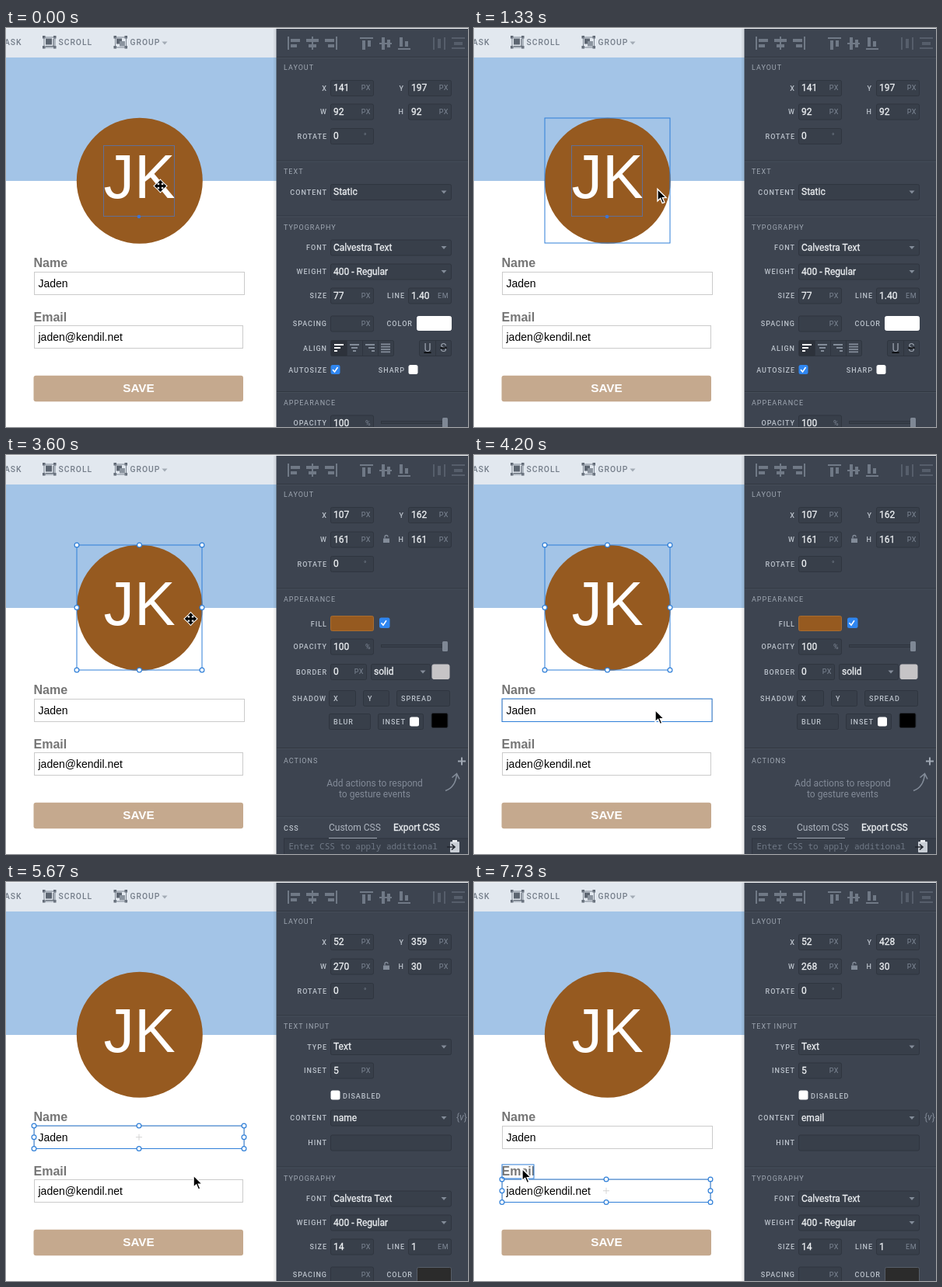
These frames come from a looping animation (594 by 514 pixels, 8000 ms). An HTML page:

```html
<!DOCTYPE html>
<html lang="en">
<head>
<meta charset="utf-8">
<title>Design editor</title>
<style>
html, body { margin: 0; width: 100%; height: 100%; overflow: hidden; background: #fff; }
svg { display: block; }
text { font-family: Roboto, sans-serif; white-space: pre; }
.bar { font-size: 10.3px; font-weight: 500; letter-spacing: 1px; fill: #747d89; }
.title { font-size: 9px; letter-spacing: 1px; fill: #a0a8b3; }
.label { font-size: 9px; font-weight: 500; letter-spacing: 1px; fill: #bcc3cc; }
.value { font-size: 12px; fill: #eceff2; stroke: #eceff2; stroke-width: .3px; }
.unit { font-size: 9px; letter-spacing: .5px; fill: #7f8896; }
.hint { font-size: 12px; fill: #828a97; }
.tab { font-size: 12px; fill: #aeb5bf; }
.mark { font-size: 14px; fill: #9aa2ae; }
.code { font: 11px "Noto Sans Mono", monospace; fill: #6f7885; }
.form { font: 14px "Liberation Sans", Arial, sans-serif; fill: #000; }
.head { font: bold 16px "Liberation Sans", Arial, sans-serif; fill: #757575; }
.save { font: bold 15.3px "Liberation Sans", Arial, sans-serif; fill: #fff; }
.logo { font: 79px "Liberation Sans", Arial, sans-serif; fill: #fff; }
</style>
</head>
<body>
<svg id="stage" width="594" height="514" viewBox="0 0 594 514"></svg>
<script>
const stage = document.getElementById('stage');
const BLUE = '#2f7fd8', BROWN = '#965a20', GREY = '#838c99';

// Markup helpers
const rect = (x, y, w, h, fill, more = '') =>
  `<rect x="${x}" y="${y}" width="${w}" height="${h}" fill="${fill}" ${more}/>`;
const path = (d, stroke, width = 1, fill = 'none') =>
  `<path d="${d}" stroke="${stroke}" stroke-width="${width}" fill="${fill}"/>`;
const text = (x, y, s, cls, anchor = 'start') =>
  `<text x="${x}" y="${y}" class="${cls}" text-anchor="${anchor}">${s}</text>`;
const frame = (x, y, w, h, color) => rect(x, y, w, h, 'none', `stroke="${color}"`);
const add = html => {
  const g = document.createElementNS('http://www.w3.org/2000/svg', 'g');
  g.innerHTML = html;
  return stage.appendChild(g);
};

// Property panel helpers; cy is the middle of a row
const title = (cy, s) => text(357, cy + 3.2, s, 'title');
const label = (cy, s, right = 412) => text(right + 1, cy + 3.5, s, 'label', 'end');
const box = (x, cy, w) => rect(x + .5, cy - 9.5, w - 1, 20, '#383f4a', 'rx="2" stroke="#2f353f"');
const field = (x, cy, value = '', unit = '', w = 56) =>
  box(x, cy, w) + text(x + 4, cy + 4, value, 'value') +
  text(x + w - 4, cy + 3, unit, 'unit', 'end');
const drop = (x, cy, value, w = 156) =>
  field(x, cy, value, '', w) +
  path(`M${x + w - 13.5} ${cy - 1.5}h7l-3.5 4z`, 'none', 0, GREY);
const rule = y => rect(348, y, 246, 1, '#313740') + rect(348, y + 1, 246, 1, '#464e5a');
const check = (x, y, size, on) =>
  rect(x, y, size, size, on ? '#2f86f0' : '#fff', 'rx="2.5"') +
  (on ? path(`M${x + 2.5} ${y + size / 2}l2.5 3l4-6`, '#fff', 1.6) : '');
const slider = cy => rect(482.5, cy - 2, 84, 3, '#383f4a', 'stroke="#2f353f"') +
  rect(561, cy - 6.5, 7, 13, '#7f8895', 'rx="1.5"');
const swatch = (x, y, w, h, fill, stroke) =>
  rect(x + .5, y + .5, w - 1, h - 1, fill, `rx="2" stroke="${stroke}"`);
const lock = rect(485, 107.5, 8, 5.5, GREY) + path('M487 107.5v-2a2 2 0 0 1 4 0', GREY, 1.3);

const layout = (x, y, w, h, shift) => title(51, 'LAYOUT') +
  label(77, 'X') + field(417, 77, x, 'PX') +
  label(77, 'Y', 511) + field(517, 77, y, 'PX') +
  label(107.5 + shift, 'W') + field(417, 107.5 + shift, w, 'PX') +
  label(107.5 + shift, 'H', 511) + field(517, 107.5 + shift, h, 'PX') +
  label(139 + shift, 'ROTATE') + field(417, 139 + shift, '0') +
  text(460, 142 + shift, '°', 'unit') + rule(170.5 + shift) + (shift ? lock : '');

const opacity = cy => label(cy, 'OPACITY') + field(417, cy, '100', '%') + slider(cy);

const font = (cy, size, line) => title(cy, 'TYPOGRAPHY') +
  label(cy + 26, 'FONT') + drop(417, cy + 26, 'Calvestra Text') +
  label(cy + 57, 'WEIGHT') + drop(417, cy + 57, '400 - Regular') +
  label(cy + 88, 'SIZE') + field(417, cy + 88, size, 'PX') +
  label(cy + 88, 'LINE', 512) + field(517, cy + 88, line, 'EM') +
  label(cy + 124, 'SPACING') + field(417, cy + 124, '', 'PX') + label(cy + 124, 'COLOR', 522);

// Bars of one paragraph icon: pull 0 is left, .5 centre, 1 right
const lines = (x, pull, color) => [12, 8, 4].map((w, i) =>
  rect(x + (12 - w) * pull, 407 + i * 4, w, 2, color)).join('');

const textPanel = () => layout(141, 197, 92, 92, 0) +
  title(185, 'TEXT') + label(211, 'CONTENT') + drop(417, 211, 'Static') + rule(241.5) +
  font(256.5, '77', '1.40') + swatch(528, 371, 45, 19, '#fff', '#fff') +
  label(412, 'ALIGN') + box(417, 412, 82) + rect(418, 402.5, 20, 20, '#2d323b') +
  lines(422, 0, '#fff') + lines(442, .5, GREY) + lines(462, 1, GREY) +
  [0, 1, 2, 3].map(i => rect(482, 406.5 + i * 3.3, 12, 1.8, GREY)).join('') +
  path('M438.5 403v19M458.5 403v19M478.5 403v19', '#2f353f') +
  box(531, 412, 42) + path('M552.5 403v19', '#2f353f') +
  `<g text-decoration="underline">${text(542, 416.5, 'U', 'mark', 'middle')}</g>` +
  `<g text-decoration="line-through">${text(562.5, 416.5, 'S', 'mark', 'middle')}</g>` +
  label(440.5, 'AUTOSIZE') + check(417.5, 434, 12, true) +
  label(440.5, 'SHARP', 512) + check(517.5, 434, 12) +
  rule(468) + title(483, 'APPEARANCE') + opacity(508.5);

const small = (x, cy, w, s) => box(x, cy, w) + text(x + 6, cy + 3.5, s, 'label');

const shapePanel = () => layout(107, 162, 161, 161, 1) +
  title(186, 'APPEARANCE') + label(217, 'FILL') + swatch(417, 207, 56, 20, BROWN, '#a86c30') +
  check(480, 209.5, 13.5, true) + opacity(246.5) +
  label(279, 'BORDER') + field(417, 279, '0', 'PX', 47) + drop(469, 279, 'solid', 77) +
  swatch(547.5, 269.5, 23, 19.5, '#c6c4c6', '#c6c4c6') +
  label(313, 'SHADOW', 411) + small(415, 313, 35, 'X') + small(459, 313, 34, 'Y') +
  small(502, 313, 69, 'SPREAD') + small(415, 343, 54, 'BLUR') + small(478, 343, 59, 'INSET') +
  check(519, 337.5, 12) + swatch(546.5, 332, 22, 20, '#000', '#2b3038') +
  rule(377) + title(394, 'ACTIONS') + path('M581 394.5h10M586 389.5v10', '#a0a8b3', 2) +
  text(474, 427, 'Add actions to respond', 'hint', 'middle') +
  text(474, 441, 'to gesture events', 'hint', 'middle') +
  path('M565 432.5Q578 428 579.5 411M573.5 415.5l6-5l3.5 7', GREY, 1.6) +
  rule(465.5) + text(357, 483.5, 'CSS', 'label') +
  text(415, 483.5, 'Custom CSS', 'tab') + text(498, 483.5, 'Export CSS', 'value') +
  rect(357.5, 494, 240, 30, '#383f4a', 'stroke="#2f353f"') + rect(415, 493, 62, 1, '#a0a8b3') +
  text(363.5, 508, 'Enter CSS to apply additional', 'code') +
  rect(571, 498, 12, 14, '#c9ced5', 'rx="1"') + rect(574, 496, 6, 3, '#e9ecef') +
  path('M567 505h9M573 501.5l4 3.5l-4 3.5', '#20252c', 1.6);

const inputPanel = (y, w, name) => layout(52, y, w, 30, 1) +
  title(186, 'TEXT INPUT') + label(212, 'TYPE') + drop(417, 212, 'Text') +
  label(242.5, 'INSET') + field(417, 242.5, '5', 'PX') +
  check(417.5, 268.5, 12) + text(433, 278.5, 'DISABLED', 'label') +
  label(303.5, 'CONTENT') + drop(417, 303.5, name) +
  text(579, 307, '{<tspan font-style="italic">v</tspan>}', 'hint') +
  label(335.5, 'HINT') + field(417, 335.5, '', '', 156) + rule(366.5) +
  font(381.5, '14', '1') + swatch(528, 496, 45, 20, '#2b2b2b', '#565d68');

// Page and form
const corners = (x, y) => [[0, 0], [14, 0], [0, 13], [14, 13]].map(([a, b]) =>
  rect(x + a, y + b, 3.5, 3.5, '#5c6571')).join('');
add(rect(0, 0, 348, 38, '#e2e8ef') +
  text(20.5, 22.3, 'MASK', 'bar', 'end') +
  text(67.5, 22.3, 'SCROLL', 'bar') + text(159.5, 22.3, 'GROUP', 'bar') +
  path('M200.5 17.5h7l-3.5 4z', 'none', 0, '#a3abb5') +
  corners(47, 10) + frame(49, 12, 14, 13, '#7b8490') + rect(51, 13.5, 8, 8, '#5c6571') +
  path('M61 14v9M51 23.5h10', '#5c6571', 1.2) +
  corners(138.5, 10) + frame(140.5, 12, 14, 13, '#7b8490') +
  rect(142, 13.5, 7, 7, '#5c6571') + rect(146, 17, 7, 6.5, '#8b949f') +
  rect(0, 38, 348, 159, '#a3c4e7') +
  `<circle cx="171.8" cy="196.7" r="81" fill="${BROWN}"/>` + text(125.5, 218.5, 'JK', 'logo') +
  text(35.5, 308, 'Name', 'head') + frame(36.5, 314.5, 270, 29, '#cbcbcb') +
  text(41.5, 334, 'Jaden', 'form') +
  text(35.5, 377.7, 'Email', 'head') + frame(36.5, 383.5, 268, 29, '#cbcbcb') +
  text(41.5, 403, 'jaden@kendil.net', 'form') +
  rect(35.5, 447.8, 269.5, 33.4, '#c5a98e', 'rx="3"') + text(170.5, 468.7, 'SAVE', 'save', 'middle'));

// Panel background and align icons
const bars = list => list.map(b => rect(...b, '#707986')).join('');
add(rect(344, 0, 4, 514, '#000', 'opacity=".06"') +
  rect(347.5, 0, 247, 514, '#3d4450') + rect(0, 0, 594, 1, '#f3f5f7') + rule(37) +
  bars([[362, 11, 2, 17], [366, 14, 12, 4], [366, 21, 8, 4],
    [393, 11, 2, 17], [386, 14, 16, 4], [389, 21, 10, 4],
    [424, 11, 2, 17], [410, 14, 12, 4], [414, 21, 8, 4],
    [455, 12, 17, 2], [458, 16, 4, 12], [465, 16, 4, 8],
    [480, 19, 16, 2], [483, 12, 4, 16], [490, 15, 4, 10],
    [504, 26, 16, 2], [506, 12, 4, 12], [513, 17, 4, 7]]) +
  `<g opacity=".5">${bars([[549, 12, 2, 16], [555, 14, 4, 12], [563, 12, 2, 16],
    [573, 12, 17, 2], [576, 18, 11, 4], [573, 25, 17, 2]])}</g>`);

const panels = [textPanel(), shapePanel(), inputPanel(359, 270, 'name'), inputPanel(428, 268, 'email')].map(add);

// Selections with eight handles
const select = (x, y, w, h, mark) => {
  let s = frame(x, y, w, h, BLUE);
  if (mark) s += path(`M${x + w / 2 - 4} ${y + h / 2}h8M${x + w / 2} ${y + h / 2 - 4}v8`, '#d4d4d4');
  for (let i = 0; i < 9; i++) if (i !== 4)
    s += `<circle cx="${x + w / 2 * (i % 3)}" cy="${y + h / 2 * (i / 3 | 0)}" r="2.9" fill="#fff" stroke="${BLUE}" stroke-width="1.2"/>`;
  return s;
};
const shapes = [[91, 116, 161, 161], [36, 314, 270, 29.5], [36, 383, 268, 29.5], [36, 364, 41, 18]];
const selections = [
  `<g opacity=".7">${frame(125.5, 151.5, 91, 91, '#4a78c8')}</g><circle cx="171" cy="243" r="2.3" fill="#3f74d0"/>`,
  select(...shapes[0]),
  select(...shapes[1], true),
  select(...shapes[2], true)
].map(add);
const hovers = shapes.map(b => add(frame(...b, BLUE)));

const arrow = add(path('M0 0v15.3l3.6-3.3l2.6 6.1l2.7-1.1l-2.6-5.9h4.8z', '#fff', 1.4, '#000'));
const tip = 'M0-7.5l3.2 3.5h-2v2.8h2.8v-2l3.5 3.2l-3.5 3.2v-2h-2.8v2.8h2l-3.2 3.5l-3.2-3.5h2v-2.8h-2.8v2l-3.5-3.2l3.5-3.2v2h2.8v-2.8h-2z';
const mover = add(path(tip, '#fff', 2.4, '#fff') + path(tip, '#000', .5, '#000'));

// Pointer moves: start, end, number of steps, goal, easing
const inOut = p => p < .5 ? 4 * p ** 3 : 1 - 4 * (1 - p) ** 3;
const out = p => 1 - (1 - p) ** 2.18;
const moves = [
  [870, 1330, 8, [237.5, 210.5], inOut],
  [3600, 4200, 10, [234.5, 331.5], inOut],
  [5400, 6070, 11, [245.5, 399], out],
  [7200, 7730, 9, [63.5, 372.5], inOut]
];
const pointer = t => {
  let pos = [198.5, 203.5];
  for (const [from, to, steps, goal, ease] of moves) {
    if (t < from) break;
    const step = Math.floor((t - from) / (to - from) * (steps - 1) + 1e-6) + 1;
    const p = ease(Math.min(1, step / steps));
    pos = pos.map((v, i) => v + (goal[i] - v) * p);
  }
  return pos;
};

const areas = [[125, 151, 92, 92], ...shapes];
const inside = (x, y, [l, t, w, h]) => x >= l && x <= l + w && y >= t && y <= t + h;
const show = (el, on) => el.style.display = on ? '' : 'none';
const phase = (t, last) => t < 1930 ? 0 : t < 4670 ? 1 : t < last ? 2 : 3;

function draw(t) {
  const [x, y] = pointer(t);
  const chosen = phase(t, 6470), panel = phase(t, 6530);
  const held = inside(x, y, areas[chosen]);
  panels.forEach((g, i) => show(g, i === panel));
  selections.forEach((g, i) => show(g, i === chosen));
  hovers.forEach((g, i) => show(g, !held && chosen !== i + 1 && inside(x, y, shapes[i])));
  show(mover, held);
  show(arrow, !held);
  mover.setAttribute('transform', `translate(${x} ${y})`);
  arrow.setAttribute('transform', `translate(${x - 1.5} ${y - 3})`);
}

let start;
function tick(now) {
  start ??= now;
  draw((now - start) % 8000);
  requestAnimationFrame(tick);
}
draw(0);
requestAnimationFrame(tick);
</script>
</body>
</html>
```
